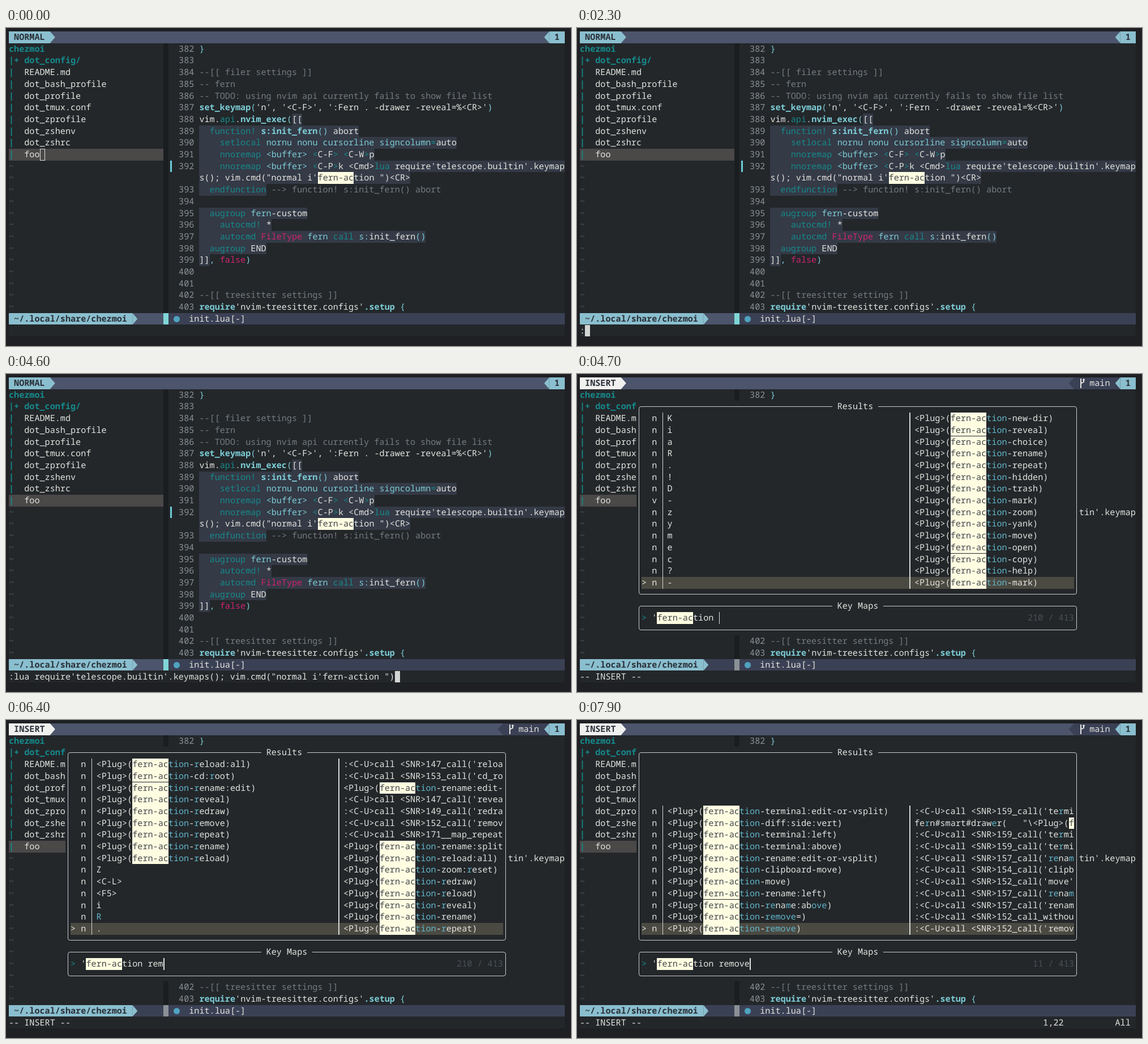
These frames come from a looping animation (998x561 px, 8 s). An HTML page:

```html
<!DOCTYPE html>
<html lang="en">
<head>
<meta charset="utf-8">
<title>Terminal editor</title>
<style>
  html, body { margin: 0; width: 100%; height: 100%; overflow: hidden; background: #1f2023; }
  #stage { position: relative; width: 998px; height: 561px; overflow: hidden;
    font: 15.154px "Noto Sans Mono", "DejaVu Sans Mono", monospace;
    text-rendering: geometricPrecision; font-variant-ligatures: none; }
  #stage div { position: absolute; box-sizing: border-box; }
  .txt { white-space: pre; height: 20.7px; line-height: 20.7px; }
  .w { color: #e4e4df; }
  .t { color: #168a8c; }
  .T { color: #168a8c; font-weight: 700; }
  .c { color: #7cccd6; }
  .C { color: #7cccd6; font-weight: 700; }
  .m { color: #62b6cb; }
  .g { color: #757b80; }
  .n { color: #8b9094; }
  .p { color: #cf2470; }
  .q { color: #4b5054; }
  .z { color: #50565a; }
  .d { color: #2a3038; font-weight: 600; }
  .h { color: #45474a; background: #fffde1; }
</style>
</head>
<body>
<div id="stage"></div>
<script>
const LOOP = 8000, W = 982 / 108, H = 20.7, X0 = 5, Y0 = 6;
const BG = '#23272a', BAR = '#3b4155', ACTIVE = '#4c556b', BLUE = '#8abfcf', SEL = '#343a46', PALE = '#f0f0ef', LINE = '#c9cccb';
const stage = document.getElementById('stage');
const layers = [];
let parent = stage;

const px = col => X0 + col * W;
const py = row => Y0 + row * H;

function add(css, cls) {
  const el = document.createElement('div');
  if (cls) el.className = cls;
  Object.assign(el.style, css);
  parent.append(el);
  return el;
}

function rect(x, y, w, h, color, css) {
  return add({ left: x + 'px', top: y + 'px', width: w + 'px', height: h + 'px', background: color, ...css });
}

const cells = (row, col, cols, rows, color) => rect(px(col), py(row), cols * W, rows * H, color);

// Powerline arrow in one cell, pointing right (1) or left (-1)
function arrow(row, col, dir, color) {
  const shape = dir > 0 ? '0 0, 100% 50%, 0 100%' : '100% 0, 0 50%, 100% 100%';
  cells(row, col, 1, 1, color).style.clipPath = `polygon(${shape})`;
}

// Markup: "^k" switches to colour class k
function put(row, col, markup) {
  for (const piece of markup.split('^').slice(1)) {
    const text = piece.slice(1);
    if (text.trim()) {
      const el = add({ left: px(col) + 'px', top: py(row) + 'px' }, 'txt ' + piece[0]);
      el.textContent = text;
      if (piece[0] === 'h') el.style.width = text.length * W + 'px';
    }
    col += text.length;
  }
}

const plain = markup => markup.replace(/\^./g, '');

function layer(from, to, draw) {
  parent = stage;
  const el = add({ left: 0, top: 0 });
  layers.push({ el, from, to });
  parent = el;
  draw();
  parent = stage;
}

const code = {
  1: '^c}',
  3: '^g--[[ filer settings ]]',
  4: '^g-- fern',
  5: '^g-- TODO: using nvim api currently fails to show file list',
  6: "^Cset_keymap^c(^w'n', '<C-F>', ':Fern . -drawer -reveal=%<CR>'^c)",
  7: '^wvim.^tapi^w.^Cnvim_exec^c(^w[[',
  8: '^t  function! ^Cs:init_fern^c() ^wabort',
  9: '^t    setlocal ^cnornu nonu cursorline signcolumn^t=^wauto',
  10: '^t    nnoremap ^c<buffer> ^t<^wC-F^t> <^wC-W^t>^wp',
  11: "^t    nnoremap ^c<buffer> ^t<^wC-P^t>^wk <Cmd>^tlua ^wrequire'telescope.builtin'.keymap",
  12: "^ws(); vim.cmd(\"normal i'^hfern-ac^wtion \")<CR>",
  13: '^t  endfunction ^g--> function! s:init_fern() abort',
  15: '^t  augroup ^cfern^w-custom',
  16: '^t    autocmd! ^w*',
  17: '^t    autocmd ^pFileType ^cfern ^tcall ^cs:^winit_fern^c()',
  18: '^t  augroup ^wEND',
  19: '^w]]^c, ^pfalse^c)',
  22: '^g--[[ treesitter settings ]]',
  23: "^Crequire^w'nvim-treesitter.configs'^C.setup ^c{"
};
const files = ['README.md', 'dot_bash_profile', 'dot_profile', 'dot_tmux.conf',
  'dot_zprofile', 'dot_zshenv', 'dot_zshrc', 'foo'];

// Editor background and bars
cells(0, 0, 108, 26, BG);
cells(0, 0, 108, 1, ACTIVE);
cells(24, 0, 108, 1, BAR);
layer(0, 4700, () => cells(24, 24, 6, 1, ACTIVE));
cells(1, 30, 1, 23, '#1b1e20');
cells(10, 0, 30, 1, '#4b4848');
cells(0, 105, 3, 1, BLUE);
arrow(0, 104, -1, BLUE);
put(0, 106, '^d1');
cells(24, 0, 24, 1, BLUE);
arrow(24, 24, 1, BLUE);
put(24, 1, '^d~/.local/share/chezmoi');
rect(296, 507.5, 11, 11, '#4fa3c0', { borderRadius: '50%' });
put(24, 35, '^winit.lua[-]');

// Embedded script background
layer(0, 4700, () => {
  cells(7, 55, 2, 1, SEL);
  for (const row of [8, 9, 10, 11, 12, 15, 16, 17, 18]) cells(row, 37, plain(code[row]).length, 1, SEL);
  cells(13, 37, 13, 1, SEL);
  cells(19, 37, 2, 1, SEL);
});

// File tree and code
put(1, 0, '^Tchezmoi');
put(2, 0, '^T|+ dot_config/');
files.forEach((name, i) => put(3 + i, 0, `^T|  ^w${name}`));
for (let row = 11; row < 24; row++) put(row, 0, '^z~');
for (let row = 1, num = 382; row < 24; row++) {
  if (row !== 12) put(row, 33, '^n' + num++);
  if (code[row]) put(row, 37, code[row]);
}
rect(290, py(11), 3, H, '#6ccdd8');

function mode(name, color, split) {
  cells(0, 0, 8, 1, color);
  arrow(0, 8, 1, color);
  put(0, 1, '^d' + name);
  cells(24, 30, 1, 1, split);
}

layer(0, 4700, () => mode('NORMAL', BLUE, '#7fd6d6'));
layer(0, 800, () => rect(px(6), py(10), W, H, 'none', { border: '1.5px solid #dcdcda' }));
layer(800, 2000, () => cells(10, 6, 1, 1, '#d3d5d4'));

// Command line
function command(from, to, text) {
  layer(from, to, () => {
    put(25, 0, '^w' + text);
    cells(25, text.length, 1, 1, '#d3d5d4');
  });
}
command(2000, 3100, ':');
command(3100, 4700, ":lua require'telescope.builtin'.keymaps(); vim.cmd(\"normal i'fern-action \")");

// Bordered window with a centred title
function frame(row, rows, title) {
  const x = px(11.5), y = py(row + 0.5);
  rect(x - 0.5, y - 0.5, 85 * W + 1, (rows - 1) * H + 1, 'none', { border: '1.2px solid ' + LINE, borderRadius: '4px' });
  cells(row, 49, title.length + 2, 1, BG);
  put(row, 50, '^w' + title);
}

layer(4700, LOOP, () => {
  mode('INSERT', PALE, '#8b9096');
  arrow(0, 95, -1, BAR);
  cells(0, 96, 9, 1, BAR);
  arrow(0, 104, -1, BLUE);
  cells(0, 105, 3, 1, BLUE);
  put(0, 106, '^d1');
  const b = '#e4e4df';
  rect(888.5, 8, 2, 17, b);
  rect(894, 9, 2, 6, b);
  rect(889.5, 14, 6, 2, b, { transform: 'rotate(-30deg)' });
  rect(892.5, 7.5, 5, 3.5, b, { clipPath: 'polygon(50% 0, 100% 100%, 0 100%)' });
  put(0, 99, '^wmain');
  put(25, 0, '^w-- INSERT --');
  cells(2, 11, 86, 20, BG);
  frame(2, 17, 'Results');
  frame(19, 3, 'Key Maps');
});

// Colours the letters of the query in order; full tells whether all were found
function match(text, query) {
  const at = text.indexOf('fern-action');
  const start = at >= 0 ? at + 11 : text.indexOf("'") + 1;
  let out = at >= 0 ? `^w${text.slice(0, at)}^hfern-ac^mtion` : '^w' + text.slice(0, start);
  const base = out + '^w' + text.slice(start);
  let k = 0;
  for (const ch of text.slice(start)) {
    const hit = k < query.length && ch.toLowerCase() === query[k];
    if (hit) k++;
    out += (hit ? '^m' : '^w') + ch;
  }
  return { base, out, full: k === query.length };
}

// "@x" is a plug mapping, "123_x" a script call
function expand(s) {
  if (s[0] === '@') return `<Plug>(fern-action-${s.slice(1)})`;
  return /^\d{3}_/.test(s) ? ':<C-U>call <SNR>' + s : s;
}

function results(from, to, query, list) {
  layer(from, to, () => {
    const top = 18 - list.length;
    cells(17, 12, 84, 1, '#4b4a42');
    for (const col of [16, 64]) rect(px(col) + 0.5, py(top), 1.5, list.length * H, '#d6d8d6');
    list.forEach((item, i) => {
      const [a, b, kind = 'n'] = item.split('|');
      const left = match(expand(a), query);
      const right = match(expand(b).slice(0, 31), query);
      put(top + i, 14, '^w' + kind);
      put(top + i, 17, left.full ? left.out : left.base);
      put(top + i, 65, (left.full ? right.base : right.out).replace(/\(\^wf$|\(f$/, '(^hf'));
    });
    put(17, 12, '^w>');
  });
}

results(4700, 6100, '', ['K|@new-dir', 'i|@reveal', 'a|@choice', 'R|@rename', '.|@repeat',
  '!|@hidden', 'D|@trash', '-|@mark|v', 'z|@zoom', 'y|@yank', 'm|@move', 'e|@open',
  'c|@copy', '?|@help', '-|@mark']);

results(6100, 6500, 'r', ["@reload:all|147_call('reload", "@cd:root|153_call('cd_root",
  '@rename:edit|@rename:edit-or-error', "@reveal|147_call('reveal", "@redraw|149_call('redraw",
  "@remove|152_call('remove", '@repeat|171__map_repeat', '@rename|@rename:split',
  '@reload|@reload:all', 'Z|@zoom:reset', '<C-L>|@redraw', '<F5>|@reload', 'i|@reveal',
  'R|@rename', '.|@repeat']);

const renames = ['right', 'left', 'rightest', 'leftest', 'below', 'above', 'bottom', 'top',
  'edit-or-tabedit', 'edit-or-vsplit', 'edit-or-split', 'edit-or-error'];
results(6500, 7600, 'remo', [...renames.map(s => `@rename:${s}|157_call('rename`),
  '@rename:edit|@rename:edit-or-error', '@remove=|152_call_without', "@remove|152_call('remove"]);

results(7600, LOOP, 'remove', ["@terminal:edit-or-vsplit|159_call('termi",
  '@diff:side:vert|fern#smart#drawer(   "\\<Plug>(f', "@terminal:left|159_call('termi",
  "@terminal:above|159_call('termi", "@rename:edit-or-vsplit|157_call('rename",
  "@clipboard-move|154_call('clipboard", "@move|152_call('move'", "@rename:left|157_call('rename",
  "@rename:above|157_call('rename", '@remove=|152_call_without', "@remove|152_call('remove"]);

// Prompt typing
const typing = [[4700, ''], [6000, 'r'], [6200, 're'], [6400, 'rem'], [6600, 'remo'], [7400, 'remov'], [7500, 'remove']];
typing.forEach(([from, text], i) => {
  layer(from, i + 1 < typing.length ? typing[i + 1][0] : LOOP, () => {
    put(20, 12, `^t> ^w'^hfern-ac^wtion ${text}`);
    rect(px(27 + text.length), py(20), 1.8, H, '#e0e2e0');
  });
});

function status(from, to, text, row, col) {
  layer(from, to, () => put(row, col - text.length, '^' + (row === 20 ? 'q' : 'w') + text));
}
status(4700, 6500, '210 / 413', 20, 96);
status(6500, 7600, '46 / 413', 20, 96);
status(7600, LOOP, '11 / 413', 20, 96);
status(6800, 7800, '1,20          All', 25, 107);
status(7800, LOOP, '1,22          All', 25, 107);

function tick(now) {
  const t = now % LOOP;
  for (const { el, from, to } of layers) el.style.display = t >= from && t < to ? '' : 'none';
  requestAnimationFrame(tick);
}
tick(performance.now());
</script>
</body>
</html>
```
